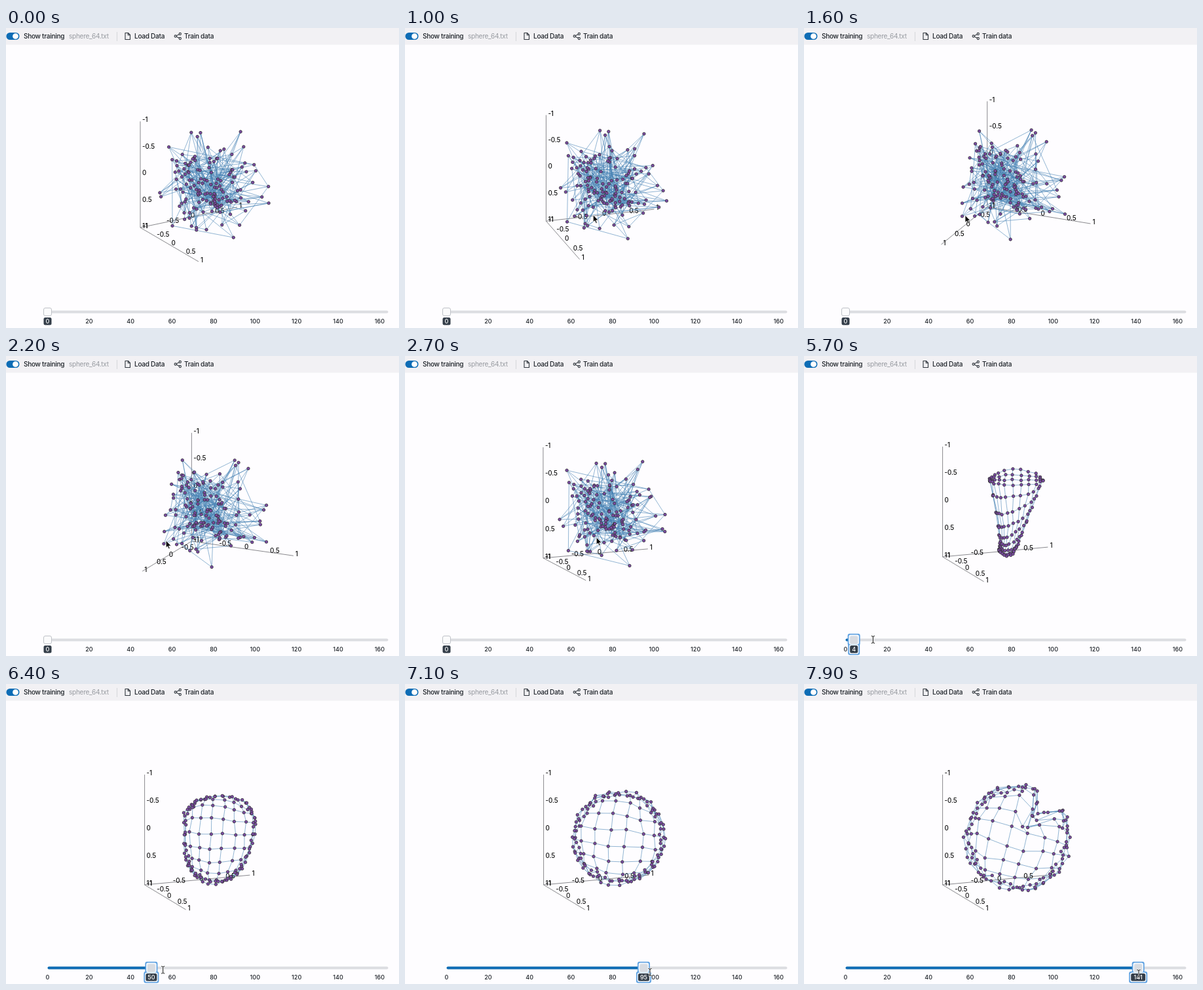
An HTML page with a canvas that plays this animation: 600 px wide and 457 px high, repeating every 8 s.

```html
<!DOCTYPE html>
<html lang="en">
<head>
<meta charset="utf-8">
<title>Self-organising map</title>
<style>
  html, body { margin: 0; width: 100%; height: 100%; overflow: hidden; background: #fefdff; }
  canvas { display: block; width: 600px; height: 457px; }
</style>
</head>
<body>
<canvas id="stage" width="600" height="457"></canvas>
<script>
const canvas = document.getElementById('stage');
const ctx = canvas.getContext('2d');
const { PI, sin, cos } = Math;
const LOOP = 8000, STEP = 100, GRID = 12;
const ROTATE_FROM = 800, ROTATE_TO = 3500, TOGGLE_OFF = 4000, TOGGLE_ON = 4500, MAP_BACK = 4700, SLIDE_FROM = 5600;
const FONT = 'Inter, Roboto, sans-serif';
const BLUE = '#0d6cb5', INK = '#1c2127';
const PALETTE = ['#1f77b4', '#ff7f0e', '#2ca02c', '#d62728', '#9467bd', '#8c564b', '#e377c2', '#7f7f7f', '#bcbd22', '#17becf'];

// Keyframes: time, then values
const cursorKeys = [[200, 316, 462], [800, 301, 284.5], [1600, 246, 285.3], [1900, 225, 284], [2000, 225, 283],
  [2700, 292.2, 276.3], [3100, 294, 288], [3500, 291.4, 277.6], [3900, 14, 13], [4700, 14, 13],
  [5500, 67, 431], [7100, 374, 439], [7900, 511, 441]];
const sliderKeys = [[5500, 0], [5700, 4], [7100, 95], [7900, 141]];

const clamp = (v, low, high) => Math.max(low, Math.min(high, v));
const mix = (a, b, f) => a.map((v, i) => v + (b[i] - v) * f);
function at(keys, t) {
  const next = clamp(keys.findIndex(k => k[0] >= t), 1, keys.length - 1);
  const a = keys[next - 1], b = keys[next];
  return mix(a, b, clamp((t - a[0]) / (b[0] - a[0]), 0, 1)).slice(1);
}

let seed = 4711;
const random = () => (seed = seed * 16807 % 2147483647) / 2147483647;
const spread = r => (random() * 2 - 1) * r;
function inBall(radius) {
  let p;
  do p = [spread(1), spread(1), spread(1)]; while (Math.hypot(...p) > radius);
  return p;
}

// Random start weights, denser around a core
const CORE = [.13, -.42, .12];
const untrained = Array.from({ length: GRID * GRID }, () => mix(CORE, inBall(1.25), random() ** .4));

// Training data on the unit sphere
const samples = Array.from({ length: 64 }, () => {
  const p = inBall(1), length = Math.hypot(...p);
  return p.map(c => c / length);
});

const sheet = (place, jitter) => untrained.map((_, k) =>
  place(k % GRID / (GRID - 1), Math.floor(k / GRID) / (GRID - 1)).map(c => c + spread(jitter)));

// A flat lid with a tapering wall below its front rim
const cone = sheet((s, t) => {
  const fall = sin(clamp((t - .3) / .7, 0, 1) * PI / 2), angle = PI * s ** 1.3;
  const bulge = -17 + 26 * Math.min(1, t / .3);
  return [324 - 14 * fall ** 3 - (40 - 28 * fall) * cos(angle),
    190 + 105 * fall + bulge * sin(angle) + 14 * sin(PI * fall) * cos(angle)];
}, 1.2);

// A square sheet wrapped around a sphere, with a slit towards the upper right
const globe = (radius, slit, turn, jitter) => sheet((s, t) => {
  const u = 2 * s - 1, v = 2 * t - 1;
  const x = u * Math.sqrt(1 - v * v / 2), y = v * Math.sqrt(1 - u * u / 2);
  const angle = Math.atan2(y, x) + turn;
  const reach = 1 - slit * Math.exp(-(((angle + .85) / .32) ** 2));
  const out = radius * sin(2 * Math.hypot(x, y) * reach);
  return [326 + out * cos(angle), 234 + out * sin(angle)];
}, jitter);

const stages = [[4, cone], [95, globe(71, .15, .1, 3)], [141, globe(80, .7, .25, 3.5)]];

function nodePositions(epoch, project) {
  let from = 0, nodes = untrained.map(project);
  for (const [until, shape] of stages) {
    const f = clamp((epoch - from) / (until - from), 0, 1) ** .7;
    nodes = nodes.map((p, k) => mix(p, shape[k], f));
    from = until;
  }
  return nodes;
}

// One pixel of dragging turns the view by one degree
function projectorAt(t) {
  const [x, y] = at(cursorKeys, clamp(t, ROTATE_FROM, ROTATE_TO));
  const yaw = (x - 270) * PI / 180, pitch = (y - 264) * PI / 180, size = 86.35;
  return ([a, b, v]) => [323.5 + size * (a * sin(yaw) + b * cos(yaw)),
    233.5 + size * ((a * cos(yaw) - b * sin(yaw)) * sin(pitch) + v * cos(pitch))];
}

// Drawing helpers
function text(s, x, y, { size = 10.1, weight = 500, color = INK, align = 'left', spacing = -.3 } = {}) {
  ctx.font = `${weight} ${size}px ${FONT}`;
  ctx.letterSpacing = spacing + 'px';
  ctx.textAlign = align;
  ctx.fillStyle = color;
  ctx.fillText(s, x, y);
}
function box(x, y, w, h, r, fill, stroke) {
  ctx.beginPath();
  ctx.roundRect(x, y, w, h, r);
  ctx.fillStyle = fill;
  ctx.fill();
  if (stroke) { ctx.strokeStyle = stroke; ctx.lineWidth = 1; ctx.stroke(); }
}
function dot([x, y], r, fill, stroke = '#333', width = .8) {
  ctx.beginPath();
  ctx.arc(x, y, r, 0, 7);
  ctx.fillStyle = fill;
  ctx.fill();
  ctx.strokeStyle = stroke;
  ctx.lineWidth = width;
  ctx.stroke();
}
function lines(pairs, color, width) {
  ctx.beginPath();
  for (const [p, q] of pairs) { ctx.moveTo(...p); ctx.lineTo(...q); }
  ctx.strokeStyle = color;
  ctx.lineWidth = width;
  ctx.stroke();
}
function shape(d, x, y, fill, stroke, width = 1) {
  const path = new Path2D(d);
  ctx.save();
  ctx.translate(x, y);
  ctx.lineWidth = width;
  ctx.lineJoin = 'round';
  if (fill) { ctx.fillStyle = fill; ctx.fill(path); }
  if (stroke) { ctx.strokeStyle = stroke; ctx.stroke(path); }
  ctx.restore();
}

function drawToolbar(on) {
  box(0, 0, 600, 25.5, 0, '#f2f1f4');
  box(.5, 7, 20, 11, 5.5, on ? BLUE : '#9299a2');
  dot([on ? 14.5 : 6.5, 12.5], 4.3, '#fff', '#fff', .2);
  text('Show training', 27, 16.3);
  text('sphere_64.txt', 96, 16.3, { weight: 400, color: '#989ba1' });
  box(169, 6, 1, 14, 0, '#d6d7da');
  shape('M.5 .5H5L8 3.5V10.5H.5ZM4.8 .5V3.7H8', 181.5, 7, null, '#30363d', 1.1);
  text('Load Data', 196, 16.3);
  const left = [258.7, 12.5], ends = [[265.8, 9], [265.8, 16]];
  lines(ends.map(end => [left, end]), '#30363d', 1.1);
  for (const p of [left, ...ends]) dot(p, 1.6, '#f2f1f4', '#30363d', 1.1);
  text('Train data', 272, 16.3);
}

function drawAxes(project) {
  const corner = [-1, -1, 1];
  for (let axis = 0; axis < 3; axis++) {
    const place = value => project(corner.map((c, i) => i === axis ? value : c));
    lines([[place(-1), place(1)]], '#6b6b70', .8);
    for (let value = -1; value <= 1; value += .5) {
      const [x, y] = place(value);
      text(value, x + 3, y + 1, { size: 9.8, color: '#111', spacing: -.1 });
    }
  }
}

function drawMap(nodes) {
  const links = [];
  nodes.forEach((p, k) => {
    if (k % GRID < GRID - 1) links.push([p, nodes[k + 1]]);
    if (k + GRID < nodes.length) links.push([p, nodes[k + GRID]]);
  });
  lines(links, 'rgba(70, 130, 180, .9)', .65);
  nodes.forEach(p => dot(p, 2.2, '#7c4ba6'));
}

function drawSlider(epoch, on, active) {
  const toX = value => 63.5 + value * 3.168, x = toX(epoch);
  const small = { size: 9, align: 'center', spacing: 0 };
  box(63.5, 430.5, 520, 4, 2, on ? '#dcdde1' : '#ebecef');
  if (epoch) box(63.5, 430.5, x - 63.5, 4, 2, BLUE);
  for (let tick = 0; tick <= 160; tick += 20)
    text(tick, toX(tick), 449.8, { ...small, color: on ? INK : '#9b9ea5' });

  const label = String(epoch), w = 7 + label.length * 5;
  if (active) {
    const parts = [[x - 6.5, 426, 13, 12], [x - w / 2, 441, w, 11.5]];
    for (const [grow, color] of [[3, '#5b9fe0'], [1.4, '#eef5fc']])
      for (const [px, py, pw, ph] of parts)
        box(px - grow, py - grow, pw + 2 * grow, ph + 2 * grow, 3, color);
  }
  const idle = on && !active;
  box(x - 6, 426.5, 12, 12, 2.5, idle ? '#fbfbfc' : '#d8dce2', idle && '#bfc2c8');
  box(x - w / 2, 441, w, 11.5, 2.5, on ? '#343e49' : '#9a9fa7');
  text(label, x, 449.8, { ...small, color: on ? '#fff' : '#eceef0' });
}

function drawCursor(t) {
  if (t < 200) return;
  const [x, y] = at(cursorKeys, t);
  if (t >= 5500) {
    const beam = 'M-2.5 -5.5Q0 -5.5 0 -4Q0 -5.5 2.5 -5.5M0 -4V4M-2.5 5.5Q0 5.5 0 4Q0 5.5 2.5 5.5';
    shape(beam, x, y, null, '#fff', 2.2);
    shape(beam, x, y, null, '#111', 1);
  } else if (t >= 3800 && t <= 4800) {
    shape('M-2 -1Q-1 -2.5 0 -1V3L4 4Q5.5 4.5 5 7L4 10H-1L-4 6Q-4 4 -2 5Z', x, y, '#fff', '#111', 1);
    shape('M.8 5V8M2.6 5.4V8', x, y, null, '#111', .6);
  } else {
    shape('M0 0V11L2.5 8.8L4.3 12.8L6.1 12L4.4 8.2H8Z', x, y, '#000', '#fff', .8);
  }
}

function draw(t) {
  const on = t < TOGGLE_OFF || t >= TOGGLE_ON;
  const showMap = t < TOGGLE_OFF || t >= MAP_BACK;
  const epoch = Math.round(at(sliderKeys, t)[0]);
  const project = projectorAt(t);
  box(0, 0, 600, 457, 0, '#fefdff');
  drawToolbar(on);
  drawAxes(project);
  if (showMap) drawMap(nodePositions(epoch, project));
  else samples.forEach((p, k) => dot(project(p), 2.2, PALETTE[k % PALETTE.length]));
  drawSlider(epoch, on, t >= SLIDE_FROM);
  drawCursor(t);
}

function frame() {
  const t = performance.now() % LOOP;
  draw(Math.floor(t / STEP) * STEP);
  requestAnimationFrame(frame);
}
frame();
</script>
</body>
</html>
```
